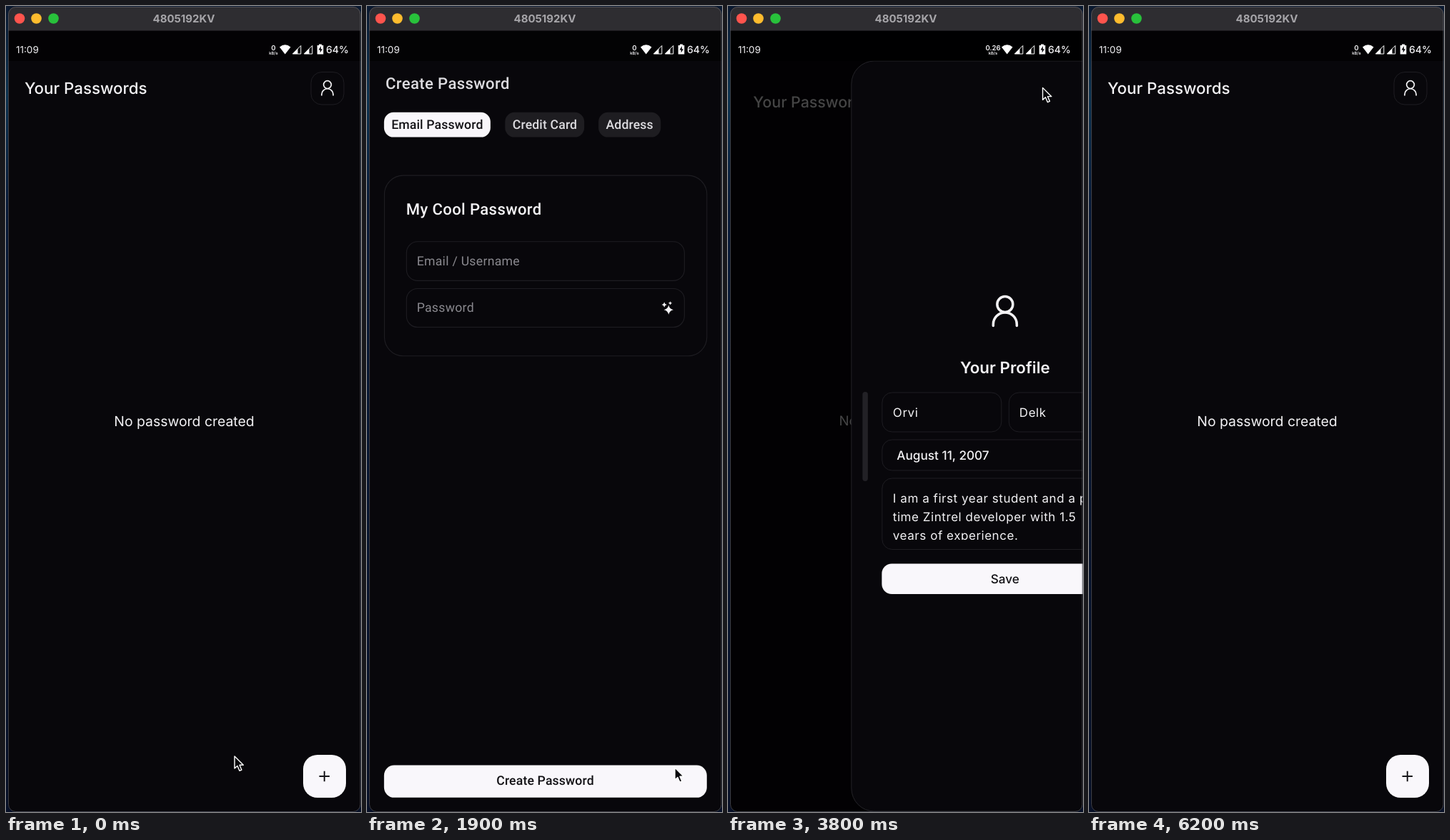
An HTML page that plays this animation: 497 px wide and 1128 px high, repeating every 6.3 s.

```html
<!DOCTYPE html>
<html lang="en">
<head>
<meta charset="utf-8">
<title>Password app</title>
<style>
html, body { margin: 0; width: 100%; height: 100%; overflow: hidden; background: #060b1c; }
svg { display: block; width: 497px; height: 1128px; }
text { font-family: Inter, sans-serif; fill: #f3f2f5; text-rendering: geometricPrecision; }
.mid { text-anchor: middle; }
.page text { font: 500 16px Roboto, sans-serif; letter-spacing: .12px; }
.page .head { font-size: 20px; letter-spacing: .33px; }
.page .hint { font-weight: 400; letter-spacing: .25px; fill: #8a898f; }
.page .soft { fill: #dddce0; }
.page .dark, .dark { fill: #131216; }
.field { font-size: 17px; letter-spacing: .55px; }
.box { fill: none; stroke: #1e1d22; }
.chip { fill: #1e1d21; }
.light { fill: #f9f7fb; }
.line { fill: none; stroke: #f3f2f5; stroke-width: 3.5; stroke-linecap: round; }
</style>
</head>
<body>
<svg viewBox="0 0 497 1128">
  <defs>
    <linearGradient id="desk" x2="0" y2="1">
      <stop offset="0" stop-color="#0a1930"/>
      <stop offset=".11" stop-color="#0d3350"/>
      <stop offset=".25" stop-color="#081a38"/>
      <stop offset="1" stop-color="#071027"/>
    </linearGradient>
    <clipPath id="window"><rect x="3" y="1" width="493.5" height="1126.5" rx="10"/></clipPath>
    <clipPath id="shape"><rect id="shapeRect"/></clipPath>
    <clipPath id="bio"><rect x="152" y="662" width="343" height="85"/></clipPath>
    <g id="user" class="line">
      <circle cy="-10" r="11"/>
      <path d="M-16.5 20v-2a16.5 16.5 0 0 1 33 0v2"/>
    </g>
    <path id="star" d="M0-6Q1-1 6 0Q1 1 0 6Q-1 1-6 0Q-1-1 0-6z" fill="#f3f2f5"/>
    <g id="signal" fill="#fff">
      <path d="M.8 12.5 12.3 1v11.5z" fill="none" stroke="#fff"/>
      <path d="M1 12.5 8 5v7.5z"/>
    </g>
  </defs>

  <rect width="497" height="1128" fill="url(#desk)"/>
  <g clip-path="url(#window)">
    <rect width="497" height="1128" fill="#08070b"/>

    <g id="home">
      <text x="26" y="123" font-size="22.3" font-weight="500">Your Passwords</text>
      <rect class="box" x="427" y="92.5" width="46" height="45.5" rx="15"/>
      <use href="#user" transform="translate(450 115) scale(.49)"/>
      <text class="mid" x="249.5" y="587.5" font-size="19.4">No password created</text>
      <rect id="scrim" y="35" width="497" height="1093"/>
      <g clip-path="url(#shape)">
        <rect id="pageBg" y="35" width="497" height="1093" fill="#08070b"/>
        <g id="page" class="page">
          <text class="head soft" x="68" y="216.5">Create Password</text>
          <rect class="light" x="66" y="246.5" width="135" height="31.5" rx="12"/>
          <rect class="chip" x="219.5" y="246.5" width="100.5" height="31.5" rx="12"/>
          <rect class="chip" x="338" y="246.5" width="79" height="31.5" rx="12"/>
          <text class="mid dark" x="133.5" y="267.5">Email Password</text>
          <text class="mid soft" x="270" y="267.5">Credit Card</text>
          <text class="mid soft" x="377.5" y="267.5">Address</text>
          <rect class="box" x="66.5" y="326.5" width="409" height="229" rx="24"/>
          <text class="head" x="94" y="376">My Cool Password</text>
          <rect class="box" x="94.5" y="410.5" width="352.5" height="49.5" rx="14"/>
          <rect class="box" x="94.5" y="470" width="352.5" height="49" rx="14"/>
          <text class="hint" x="107.5" y="440.5">Email / Username</text>
          <text class="hint" x="107.5" y="499.5">Password</text>
          <use href="#star" transform="translate(427 497)"/>
          <use href="#star" transform="translate(421.5 490.5) scale(.55)"/>
          <use href="#star" transform="translate(429 488.5) scale(.4)"/>
          <rect class="light" x="66" y="1074.5" width="409.5" height="41" rx="13"/>
          <text class="mid dark" x="270.5" y="1099.5">Create Password</text>
        </g>
        <g id="fab">
          <rect class="light" width="60" height="300"/>
          <path d="M22.5 30h14.5M29.75 22.75v14.5" stroke="#18171b" stroke-width="2"/>
        </g>
      </g>
    </g>

    <rect id="dim" y="35" width="497" height="1093"/>
    <g id="drawer">
      <rect x="108.5" y="77" width="430" height="1050" rx="32" fill="#08070b" stroke="#242328"/>
      <rect x="124" y="540" width="7.5" height="125" rx="3.7" fill="#222126"/>
      <use href="#user" x="323.5" y="427.5"/>
      <text class="mid" x="323.5" y="514" font-size="22.4" font-weight="600">Your Profile</text>
      <rect class="box" x="151.5" y="541" width="167" height="55" rx="14"/>
      <rect class="box" x="329" y="541" width="166" height="55" rx="14"/>
      <rect class="box" x="151.5" y="607" width="343.5" height="43" rx="14"/>
      <rect class="box" x="151.5" y="661" width="343.5" height="99.5" rx="14"/>
      <text class="field" x="166.5" y="574.5">Orvi</text>
      <text class="field" x="343.5" y="574.5">Delk</text>
      <text x="172" y="635" font-size="17.2" font-weight="500">August 11, 2007</text>
      <g fill="none" stroke="#8f8e94" stroke-width="1.7">
        <rect x="457" y="622" width="15.5" height="15" rx="1.5"/>
        <path d="M457 623.5h15.5" stroke-width="4"/>
        <path d="M460.5 619v3M469 619v3"/>
      </g>
      <g class="field" clip-path="url(#bio)">
        <text x="166.5" y="695">I am a first year student and a part</text>
        <text x="166.5" y="721">time Zintrel developer with 1.5</text>
        <text x="166.5" y="747">years of experience.</text>
      </g>
      <path d="M482 757l10-10M487.5 757l4.5-4.5" stroke="#c9c8cc"/>
      <rect class="light" x="151" y="780.5" width="344.5" height="42.5" rx="14"/>
      <text class="mid dark" x="323.5" y="808" font-size="17.2" font-weight="500">Save</text>
    </g>

    <rect y="35" width="497" height="42" opacity=".6"/>
    <text x="14" y="65.5" font-size="13.5">11:09</text>
    <g id="net" class="mid" font-weight="600">
      <text id="rate" y="61.5" font-size="9.6"></text>
      <text y="68" font-size="5.8">kB/s</text>
    </g>
    <path d="M383 57.5Q390.7 51 398.5 57.5L390.7 67.5z" fill="#fff"/>
    <use href="#signal" x="400.5" y="54.5"/>
    <use href="#signal" x="416.5" y="54.5"/>
    <path d="M438 53.5h4v1.5h2.3v12.5h-8.6v-12.5h2.3z" fill="#fff"/>
    <path d="M441 56l-3.5 5.5h2.2v4l3.3-5.3h-2.2z" fill="#08070b"/>
    <text x="448" y="65.5" font-size="14" font-weight="500">64%</text>

    <rect width="497" height="34.5" fill="#2e2d31"/>
    <circle cx="19" cy="17.5" r="7.3" fill="#ff544d"/>
    <circle cx="42.5" cy="17.5" r="7.3" fill="#febc2e"/>
    <circle cx="66.5" cy="17.5" r="7.3" fill="#28c13b"/>
    <text class="mid" x="249" y="22.5" font-size="15" font-weight="700" style="fill:#a6a5a9">4805192KV</text>
  </g>
  <rect x="3.5" y="1.5" width="492.5" height="1126" rx="10" fill="none" stroke="#77777f" stroke-opacity=".5"/>

  <g id="cursor" fill="#08070b" stroke="#fff" stroke-width="1.4" stroke-linejoin="round">
    <path id="arrow" d="M0 0v17l3.9-3.6 3 6.9 3-1.3-2.9-6.7h5.3z"/>
    <path id="resize" d="M0 0l6-6v4h7v-4l6 6-6 6v-4h-7v4z"/>
  </g>
</svg>
<script>
const $ = id => document.getElementById(id);
const LOOP = 6300;
const FAB = [416, 1048, 60, 60], FULL = [4, 35, 492, 1093];
const OPEN = 828, CLOSE = 2088, SPAN = 600;
const PAGE_WIDTH = 445.8;

const clamp = v => Math.min(1, Math.max(0, v));
const mix = (a, b, k) => a + (b - a) * k;
const smooth = v => v * v * (3 - 2 * v);
const easeOut = v => 1 - (1 - v) ** 3;
const set = (id, attrs) => {
  for (const name in attrs) $(id).setAttribute(name, attrs[name]);
};

// cubic-bezier(.4, 0, .2, 1)
function fastOutSlowIn(x) {
  let lo = 0, hi = 1;
  for (let i = 0; i < 20; i++) {
    const s = (lo + hi) / 2, r = 1 - s;
    if (1.2 * r * r * s + .6 * r * s * s + s ** 3 < x) lo = s; else hi = s;
  }
  return smooth((lo + hi) / 2);
}

// time, x, y
const path = [
  [0, 320, 1050], [100, 320, 1050], [650, 431, 1066], [2350, 431, 1066],
  [2780, 489, 384], [2850, 489, 384], [3400, 443, 112], [3750, 443, 112],
  [4180, 380, 173], [4350, 380, 173], [4850, 73, 319], [5400, 73, 319], [5800, -20, 345]
];

function drawCursor(t) {
  let i = 0;
  while (i < path.length - 2 && t >= path[i + 1][0]) i++;
  const [t0, x0, y0] = path[i], [t1, x1, y1] = path[i + 1];
  const k = smooth(clamp((t - t0) / (t1 - t0)));
  const x = mix(x0, x1, k), onEdge = x > 486;
  set("cursor", { transform: `translate(${x} ${mix(y0, y1, k)})` });
  set("arrow", { display: onEdge ? "none" : "inline" });
  set("resize", { display: onEdge ? "inline" : "none" });
}

// The round button grows into the form page and shrinks back
function drawPage(t) {
  const closing = t >= CLOSE;
  const e = clamp((t - (closing ? CLOSE : OPEN)) / SPAN);
  const grow = closing ? 1 - fastOutSlowIn(e) : fastOutSlowIn(e);
  const white = closing ? clamp((e - .2) / .36) : 1 - clamp((e - .2) / .2);
  const [x, y, width, height] = FAB.map((v, i) => mix(v, FULL[i], grow));
  set("shapeRect", { x, y, width, height, rx: 20 * (1 - grow) });
  set("page", {
    transform: `translate(${x} ${y}) scale(${width / PAGE_WIDTH}) translate(-48 -143.4)`,
    opacity: clamp(1 - 1.3 * white)
  });
  set("pageBg", { opacity: 1 - .45 * white });
  set("fab", { transform: `translate(${x} ${y}) scale(${width / 60})`, opacity: white });
  set("scrim", { opacity: .56 * (closing ? grow : clamp(e / .2)) });
}

function drawDrawer(t) {
  const k = easeOut(clamp((t - 3620) / 400)) * (1 - easeOut(clamp((t - 4900) / 350)));
  set("home", { transform: `translate(250 581) scale(${1 - .05 * k}) translate(-250 -581)` });
  set("dim", { opacity: .86 * k });
  set("drawer", { transform: `translate(${(1 - k) * 392} 0)` });
}

function draw(t) {
  const busy = t >= 2500 && t < 4900;
  $("rate").textContent = busy ? "0.26" : "0";
  set("net", { transform: `translate(${busy ? 371 : 374.5} 0)` });
  drawPage(t);
  drawDrawer(t);
  drawCursor(t);
}

const start = performance.now();
function tick() {
  draw((performance.now() - start) % LOOP);
  requestAnimationFrame(tick);
}
tick();
</script>
</body>
</html>
```
